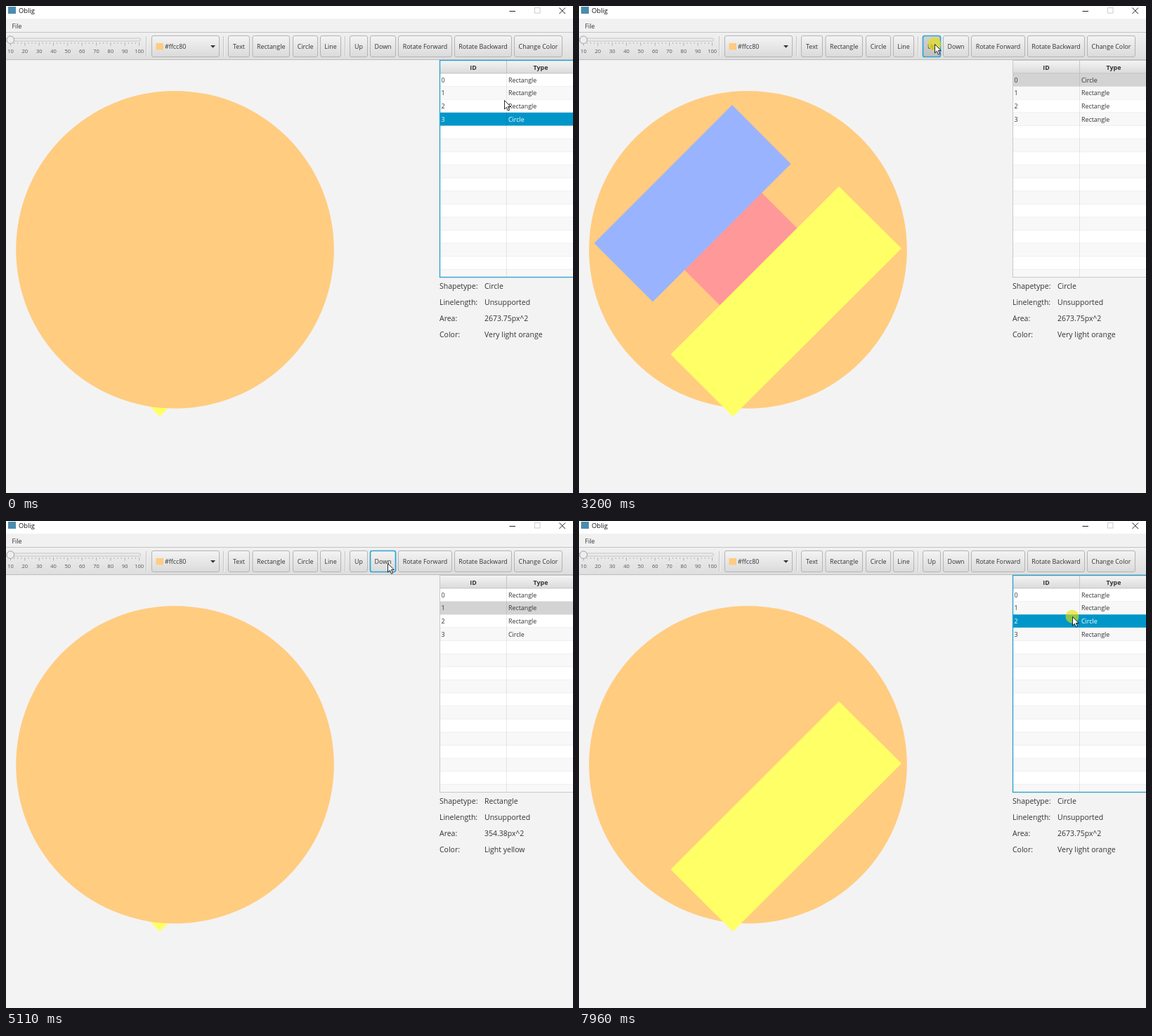
Recreate the animation shown at these times as an HTML page. Size 807 by 694 pixels, loop 8000 ms.

```html
<!DOCTYPE html>
<html lang="en">
<head>
<meta charset="utf-8">
<title>Shape editor</title>
<style>
html, body { margin: 0; width: 100%; height: 100%; overflow: hidden; background: #f3f3f3; }
svg { display: block; width: 100vw; height: 100vh; }
text { font: 8.9px "Open Sans", "Noto Sans", sans-serif; fill: #333; }
.mid { text-anchor: middle; }
.tick { font-size: 7.5px; fill: #555; }
.head { font-weight: 700; }
.info { font-size: 10.5px; }
.title { font-size: 9.4px; fill: #111; }
</style>
</head>
<body>
<svg id="stage" viewBox="0 0 807 694" preserveAspectRatio="none">
  <defs>
    <linearGradient id="bar" x2="0" y2="1"><stop stop-color="#f1f1f1"/><stop offset="1" stop-color="#dedede"/></linearGradient>
    <linearGradient id="up" x2="0" y2="1"><stop stop-color="#f4f4f4"/><stop offset="1" stop-color="#dadada"/></linearGradient>
    <linearGradient id="down" x2="0" y2="1"><stop stop-color="#d2d2d2"/><stop offset="1" stop-color="#bfbfbf"/></linearGradient>
  </defs>
</svg>
<script>
const LOOP = 8000, STEP = 80;
const ROW_TOP = 96, ROW_H = 18.62, COL = 712.5, TABLE_X = 617.5, TABLE_END = 386.5;
const stage = document.getElementById("stage");

function set(el, attrs) {
  for (const key in attrs) el.setAttribute(key, attrs[key]);
  return el;
}
function add(tag, attrs, parent = stage) {
  const el = document.createElementNS("http://www.w3.org/2000/svg", tag);
  return parent.appendChild(set(el, attrs));
}
const rect = (x, y, width, height, fill, more) => add("rect", { x, y, width, height, fill, ...more });
const line = (x1, y1, x2, y2, stroke, more) => add("path", { d: `M${x1} ${y1}L${x2} ${y2}`, stroke, ...more });
function label(x, y, str, cls = "") {
  const el = add("text", { x, y, class: cls });
  el.textContent = str;
  return el;
}

// Canvas shapes, keyed by the letters used in the stacking orders
const canvas = add("g", {});
const shapes = {
  T: add("path", { d: "M150 376L200.5 426.5L310.5 316.5L260 266Z", fill: "#ff9999" }, canvas),
  Y: add("path", { d: "M370 257L459 345.5L219 585L130.5 496.5Z", fill: "#ffff66" }, canvas),
  B: add("path", { d: "M218 141L301.5 225L105 421.5L21.5 338Z", fill: "#99b3ff" }, canvas),
  C: add("circle", { cx: 240.5, cy: 347.3, r: 226.3, fill: "#ffcc80" }, canvas)
};

// Title bar and menu
rect(0, 0, 807, 18, "#fff");
rect(3, 1, 11, 10, "#4b8bad");
label(18, 10, "Oblig", "title");
line(716.5, 7.5, 725, 7.5, "#222");
rect(752.5, 2.5, 7.5, 7.5, "none", { stroke: "#ccc" });
add("path", { d: "M787.5 2.5L796 11M796 2.5L787.5 11", stroke: "#222" });
rect(0, 18, 807, 20, "#f1f1f1");
label(8.5, 32, "File");

// Toolbar
rect(0, 38, 807, 38, "url(#bar)");
line(0, 37.5, 807, 37.5, "#c4c4c4");
line(0, 76.5, 807, 76.5, "#bcbcbc");
rect(-4, 46, 195.5, 4, "#ececec", { rx: 2, stroke: "#b9b9b9", "stroke-width": 0.8 });
for (let i = 0; i <= 36; i++) {
  const x = 6.5 + i * 5.086;
  line(x, 52, x, i % 4 ? 54 : 56.5, "#999", { "stroke-width": 0.7 });
  if (i % 4 === 0) label(x, 66.5, 10 + i * 2.5, "tick mid");
}
add("circle", { cx: 6.3, cy: 48.2, r: 5.3, fill: "#eee", stroke: "#a0a0a0" });
for (const x of [199.5, 309.5, 482.5]) {
  line(x, 43, x, 72, "#c6c6c6");
  line(x + 1, 43, x + 1, 72, "#f4f4f4");
}

const box = (x0, x1) => rect(x0 + 0.5, 42.5, x1 - x0 - 1, 30, "url(#up)", { rx: 2.5, stroke: "#b4b4b4" });
box(207, 304);
rect(213.5, 53, 10.5, 9.5, "#ffcc80");
label(226, 61, "#ffcc80");
add("path", { d: "M291 56H298L294.5 59.8Z", fill: "#333" });

const buttons = {};
for (const [name, x0, x1] of [
  ["Text", 316, 347], ["Rectangle", 350.5, 404], ["Circle", 408, 444], ["Line", 447, 477],
  ["Up", 489, 515], ["Down", 518, 555], ["Rotate Forward", 558, 635],
  ["Rotate Backward", 638, 720], ["Change Color", 723, 792]
]) {
  buttons[name] = box(x0, x1);
  label((x0 + x1) / 2, 61, name, "mid");
}

// Table
rect(TABLE_X, 77.5, 190, 309, "#fff");
rect(TABLE_X, 78, 190, 18, "url(#up)");
label(665, 90.5, "ID", "head mid");
label(761, 90.5, "Type", "head mid");
for (let i = 0; i < 16; i++) {
  const y = ROW_TOP + i * ROW_H;
  rect(TABLE_X, y, 190, Math.min(ROW_H, TABLE_END - y), i % 2 ? "#f8f8f8" : "#fff");
  line(TABLE_X, y, 807, y, "#ececec", { "stroke-width": 0.8 });
}
const selection = rect(TABLE_X, 0, 190, ROW_H, "#d3d3d3");
line(COL, 78, COL, 96, "#c4c4c4");
line(COL, 96, COL, TABLE_END, "#000", { opacity: 0.08 });
line(TABLE_X, 95.8, 807, 95.8, "#c4c4c4");
const rows = [0, 1, 2, 3].map(i => {
  const y = 108.8 + i * ROW_H;
  return [label(619.5, y, i), label(715, y, "")];
});
const frame = rect(TABLE_X, 77.5, 200, 309, "none", { stroke: "#c8c8c8" });

// Details of the selected shape
const CIRCLE = ["Circle", "Unsupported", "2673.75px^2", "Very light orange"];
const YELLOW = ["Rectangle", "Unsupported", "354.38px^2", "Light yellow"];
const details = ["Shapetype:", "Linelength:", "Area:", "Color:"].map((name, i) => {
  const y = 402.5 + i * 23.3;
  label(617, y, name, "info");
  return label(681, y, "", "info");
});

// Pointer
const halo = add("circle", { r: 9.5, fill: "#e6e000", opacity: 0.62 });
const pointer = add("path", {
  d: "M.5.5V13L3.3 10.3L5.5 15.2L7.6 14.2L5.4 9.5H9.2Z",
  fill: "#fff", stroke: "#111", "stroke-width": 0.9
});

// Timelines: [start, value]
const ORDER = [[0, "TYBC"], [850, "TYCB"], [1320, "TCYB"], [1950, "CTYB"], [3210, "TCYB"], [3680, "TYCB"],
  [4070, "TYBC"], [5110, "YTBC"], [6040, "TYBC"], [6200, "TBYC"], [6520, "TBCY"]];
const FOCUS = [[0, "table"], [770, "Down"], [2580, "table"], [3130, "Up"], [4710, "table"],
  [5030, "Down"], [5960, "Up"], [7960, "table"]];
const SELECTED = [[0, 3], [2580, 0], [4710, 1], [6040, 0], [7960, 2]];
const DETAILS = [[0, CIRCLE], [4710, YELLOW], [7960, CIRCLE]];
const PRESSES = [770, 1240, 1790, 2580, 3130, 3600, 3990, 4710, 5030, 5340, 5570, 5960, 6120, 6440, 6680, 7960];
// Pointer moves: [start, steps, x, y]
const MOVES = [[70, 5, 525, 55], [550, 3, 545, 57], [1480, 1, 544, 57], [2180, 5, 720, 103], [2660, 5, 497, 55],
  [3130, 1, 506, 54], [4150, 7, 705, 122], [4870, 3, 543, 60], [5800, 3, 502, 58],
  [6920, 2, 480, 56], [7080, 9, 653, 127], [7800, 2, 702, 136]];

const at = (track, t) => track.filter(([start]) => start <= t).pop()[1];

function pointerAt(t) {
  let x = 709, y = 134;
  for (const [start, steps, toX, toY] of MOVES) {
    if (t < start) break;
    const p = Math.min(1, (Math.floor((t - start) / STEP) + 1) / steps);
    const e = p * p * (3 - 2 * p);
    x += (toX - x) * e;
    y += (toY - y) * e;
  }
  return [x, y];
}

let shownOrder = "";
function draw(t) {
  const order = at(ORDER, t), focus = at(FOCUS, t), row = at(SELECTED, t);
  const inTable = focus === "table";
  if (order !== shownOrder) {
    for (const key of order) canvas.appendChild(shapes[key]);
    shownOrder = order;
  }
  rows.forEach((cells, i) => {
    cells[1].textContent = order[i] === "C" ? "Circle" : "Rectangle";
    for (const cell of cells) cell.style.fill = inTable && i === row ? "#fff" : "#333";
  });
  set(selection, { y: ROW_TOP + row * ROW_H, fill: inTable ? "#0096c9" : "#d3d3d3" });
  set(frame, { stroke: inTable ? "#2fa5d2" : "#c8c8c8", "stroke-width": inTable ? 1.4 : 1 });
  at(DETAILS, t).forEach((value, i) => { details[i].textContent = value; });

  const clicked = PRESSES.some(p => t >= p && t < p + STEP);
  const held = clicked || (t >= 1790 && t < 1950);
  for (const name of ["Up", "Down"]) {
    const on = focus === name;
    set(buttons[name], {
      fill: on && held ? "url(#down)" : "url(#up)",
      stroke: on ? "#2fa5d2" : "#b4b4b4",
      "stroke-width": on ? 1.7 : 1
    });
  }

  const [x, y] = pointerAt(t);
  set(pointer, { transform: `translate(${x} ${y})` });
  set(halo, { cx: x, cy: y, visibility: clicked ? "visible" : "hidden" });
}

const began = performance.now();
function tick() {
  draw((performance.now() - began) % LOOP);
  requestAnimationFrame(tick);
}
tick();
</script>
</body>
</html>
```
